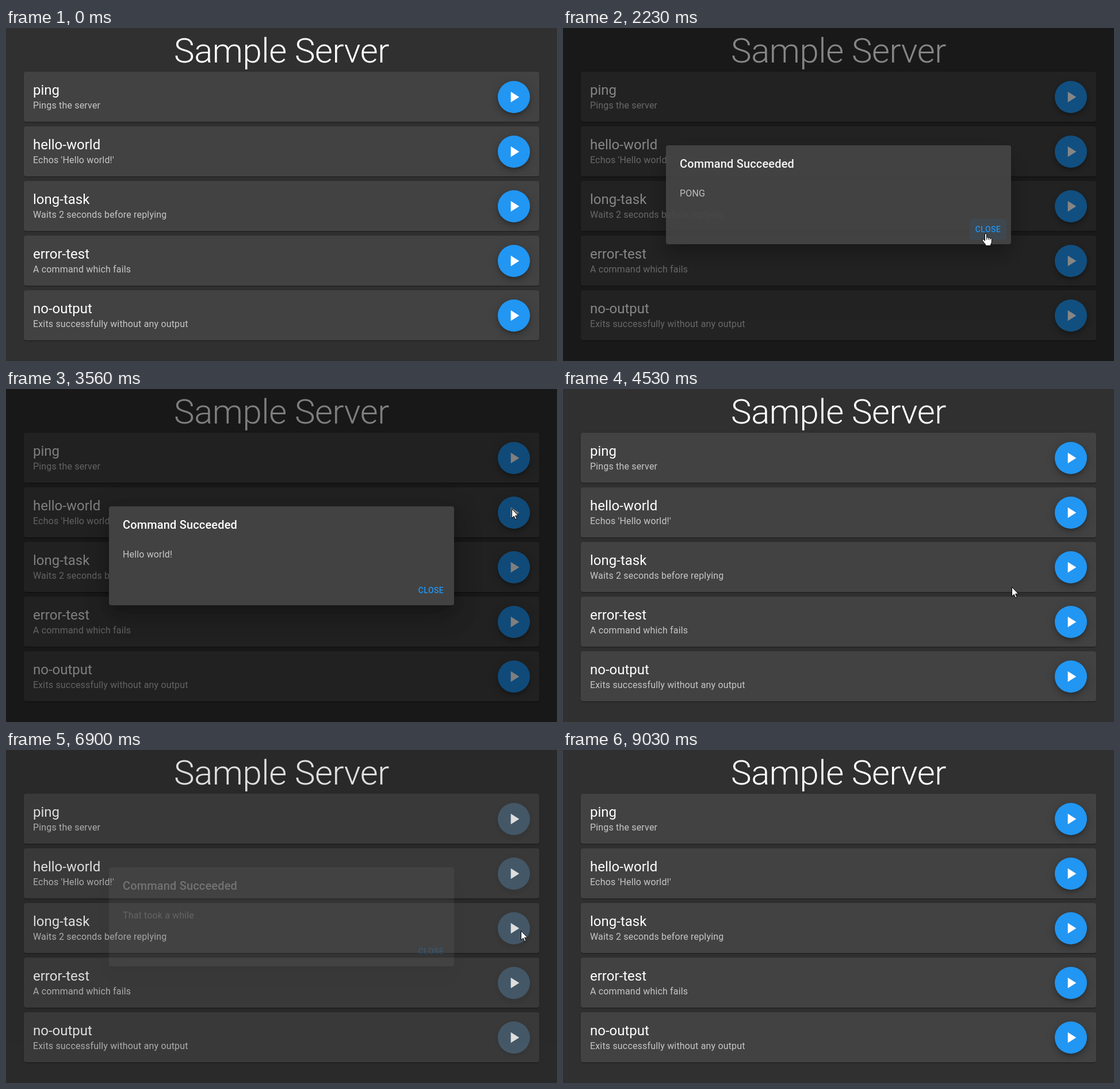
Recreate the animation shown at these times as an HTML page. Size 958 by 579 pixels, loop 9060 ms.

```html
<!DOCTYPE html>
<html lang="en">
<head>
<meta charset="utf-8">
<title>Sample Server</title>
<style>
  html, body { margin: 0; width: 100%; height: 100%; overflow: hidden; background: #303030; }
  #stage {
    position: relative; width: 958px; height: 579px; overflow: hidden;
    background: #303030; color: #fff; font: 400 16px Roboto, sans-serif; cursor: none;
  }
  #stage * { box-sizing: border-box; }
  h1, h2, h3, p { margin: 0; font-weight: 400; white-space: nowrap; }
  h1 {
    position: absolute; top: 4px; width: 100%; text-align: center;
    font-size: 60px; font-weight: 300; line-height: 72px; letter-spacing: -0.00833em;
  }
  .card {
    position: absolute; left: 31px; width: 896px; height: 87px; padding: 16px;
    border-radius: 4px; background: #424242;
    box-shadow: 0 2px 1px -1px rgba(0,0,0,.2), 0 1px 1px rgba(0,0,0,.14), 0 1px 3px rgba(0,0,0,.12);
  }
  .card h2 { font-size: 24px; line-height: 32px; }
  .card p { line-height: 22.88px; letter-spacing: 0.01071em; color: rgba(255,255,255,.7); }
  .fab { position: absolute; left: 824px; top: 16px; width: 56px; height: 56px; border-radius: 50%; }
  .fab svg { position: absolute; left: 12px; top: 12px; width: 32px; height: 32px; }
  #ring { position: absolute; left: 849px; width: 68px; height: 68px; }
  #ring circle { fill: none; stroke: #4caf50; stroke-width: 3.6; }
  #modal { position: absolute; inset: 0; background: rgba(0,0,0,.5); }
  #dialog {
    position: absolute; left: 179px; top: 204px; width: 600px; height: 172px;
    border-radius: 4px; background: #424242;
    box-shadow: 0 11px 15px -7px rgba(0,0,0,.2), 0 24px 38px 3px rgba(0,0,0,.14), 0 9px 46px 8px rgba(0,0,0,.12);
  }
  #dialog h3 {
    position: absolute; left: 24px; top: 16px;
    font-size: 20px; font-weight: 500; line-height: 32px; letter-spacing: 0.0075em;
  }
  #reply {
    position: absolute; left: 24px; top: 72px;
    line-height: 24px; letter-spacing: 0.00938em; color: rgba(255,255,255,.7);
  }
  #close {
    position: absolute; left: 528px; top: 128px; width: 64px; height: 36px; border-radius: 4px;
    text-align: center; color: #2196f3;
    font-size: 14px; font-weight: 500; line-height: 36px; letter-spacing: 0.02857em;
  }
  #cursor { position: absolute; left: 0; top: 0; width: 24px; height: 26px; overflow: visible; }
  #cursor path { fill: #fff; stroke: #000; stroke-width: 1; stroke-linejoin: round; }
  #cursor .line { fill: none; }
</style>
</head>
<body>
<div id="stage">
  <h1>Sample Server</h1>
  <div id="cards"></div>
  <svg id="ring" viewBox="0 0 44 44"><circle cx="22" cy="22" r="20.2"/></svg>
  <div id="modal">
    <div id="dialog">
      <h3>Command Succeeded</h3>
      <p id="reply"></p>
      <div id="close">CLOSE</div>
    </div>
  </div>
  <svg id="cursor">
    <path id="arrow" d="M.5 .5V16.6L4.2 13.1 6.6 18.8 9 17.8 6.6 12.2H11.7Z"/>
    <g id="hand">
      <path d="M-1.5 13V2Q-1.5 .5 0 .5T1.5 2V7.2Q3 6 4.5 7.6 6 6.7 7.3 8.4 10 7.6 10.4 10.4V15Q10.2 17.3 8.8 19V21.5H-.3V19.6Q-3.2 16.8-5.6 12.6-6.6 10.6-5.2 10.2-3.6 9.8-1.5 13Z"/>
      <path class="line" d="M1.5 7V11M4.5 7.8V11M7.4 8.5V11.5"/>
    </g>
  </svg>
</div>
<script>
const LOOP = 9060;
const FADE_IN = 225, FADE_OUT = 195, TINT = 250, SPIN = 1400;
const BLUE = [33, 150, 243], DARK = [25, 118, 210], GREY = [89, 89, 89];

const commands = [
  ["ping", "Pings the server"],
  ["hello-world", "Echos 'Hello world!'"],
  ["long-task", "Waits 2 seconds before replying"],
  ["error-test", "A command which fails"],
  ["no-output", "Exits successfully without any output"]
];

const runs = [
  { row: 0, click: 1050, reply: 1125, close: 2205, text: "PONG" },
  { row: 1, click: 3010, reply: 3085, close: 4230, text: "Hello world!" },
  { row: 2, click: 4980, reply: 6843, close: 7868, text: "That took a while" }
];

// row, pointer enters, pointer leaves or button is disabled
const hovers = [[0, 690, 1050], [1, 2690, 3010], [2, 4640, 4980], [2, 8063, 8160]];

// time, x, y of the pointer
const route = [
  [330, 960, 152], [850, 888, 122], [1400, 888, 122], [1950, 735, 357],
  [2380, 735, 357], [2830, 879, 208], [3680, 879, 208], [4080, 737, 355],
  [4380, 737, 355], [4800, 895, 314], [8050, 895, 314], [8380, 960, 338]
];

const $ = id => document.getElementById(id);
const clamp = x => Math.max(0, Math.min(1, x));
const mix = (a, b, p) => a + (b - a) * p;
const blend = (a, b, p) => a.map((v, i) => mix(v, b[i], p));

function bezier(x1, x2, y1, y2) {
  const at = (a, b, s) => 3 * (1 - s) * (1 - s) * s * a + 3 * (1 - s) * s * s * b + s * s * s;
  return x => {
    x = clamp(x);
    if (x === 0 || x === 1) return x;
    let lo = 0, hi = 1;
    for (let i = 0; i < 24; i++) {
      const mid = (lo + hi) / 2;
      if (at(x1, x2, mid) < x) lo = mid; else hi = mid;
    }
    return at(y1, y2, lo);
  };
}
const standard = bezier(.4, .2, 0, 1);
const easeInOut = bezier(.42, .58, 0, 1);

// rises after `from`, falls after `to`, also when cut short
const pulse = (t, from, to, up, down) =>
  standard((Math.min(t, to) - from) / up) * (1 - standard((t - to) / down));

const fabs = commands.map(([name, info], i) => {
  const card = document.createElement("div");
  card.className = "card";
  card.style.top = 76 + 95 * i + "px";
  card.innerHTML = `<h2>${name}</h2><p>${info}</p>
    <div class="fab"><svg viewBox="0 0 24 24"><path d="M8 5v14l11-7z"/></svg></div>`;
  $("cards").append(card);
  return { box: card.querySelector(".fab"), icon: card.querySelector("path") };
});

function drawFabs(t, busy) {
  const grey = Math.max(...runs.map(r => pulse(t, r.click, r.reply, TINT, TINT)));
  const shade = a => `rgba(0,0,0,${a * (1 - grey)})`;
  const shadow = `0 3px 5px -1px ${shade(.2)}, 0 6px 10px ${shade(.14)}, 0 1px 18px ${shade(.12)}`;
  fabs.forEach(({ box, icon }, i) => {
    const hover = Math.max(0, ...hovers.filter(h => h[0] === i)
      .map(h => pulse(t, h[1], h[2], TINT, TINT)));
    box.style.background = `rgb(${blend(blend(BLUE, DARK, hover), GREY, grey)})`;
    box.style.boxShadow = shadow;
    icon.setAttribute("fill", busy ? "rgba(255,255,255,.3)" : "#fff");
  });
}

function drawRing(t, busy) {
  $("ring").style.display = busy ? "" : "none";
  if (!busy) return;
  const turn = (t - busy.click) / SPIN % 1;
  const grow = easeInOut(turn * 2), chase = easeInOut(turn * 2 - 1);
  const circle = $("ring").firstElementChild;
  $("ring").style.top = 276 + 95 * (busy.row - 2) + "px";
  circle.setAttribute("stroke-dasharray", `${mix(1, 100, grow)} 200`);
  circle.setAttribute("stroke-dashoffset", -15 * grow - 110 * chase);
  circle.setAttribute("transform", `rotate(${turn * 360} 22 22)`);
}

function drawDialog(t, open, overClose) {
  $("modal").style.display = open ? "" : "none";
  if (!open) return;
  $("modal").style.opacity = pulse(t, open.reply, open.close, FADE_IN, FADE_OUT);
  $("reply").textContent = open.text;
  $("close").style.background = overClose ? "rgba(33,150,243,.08)" : "none";
}

function pointerAt(t) {
  const i = route.findIndex(p => p[0] > t);
  if (i < 1) return null;
  const [a, b] = [route[i - 1], route[i]];
  const p = easeInOut((t - a[0]) / (b[0] - a[0]));
  return { x: mix(a[1], b[1], p), y: mix(a[2], b[2], p) };
}

function drawPointer(pos, hand) {
  $("cursor").style.display = pos ? "" : "none";
  if (!pos) return;
  $("cursor").style.transform = `translate(${Math.round(pos.x)}px, ${Math.round(pos.y)}px)`;
  $("arrow").style.display = hand ? "none" : "";
  $("hand").style.display = hand ? "" : "none";
}

function draw(t) {
  const busy = runs.find(r => t >= r.click && t < r.reply);
  const open = runs.find(r => t >= r.reply && t < r.close + FADE_OUT);
  const pos = pointerAt(t);
  const overClose = !!(pos && open && pos.x > 707 && pos.x < 771 && pos.y > 332 && pos.y < 368);
  const overFab = !!pos && !open && !busy &&
    fabs.some((_, i) => Math.hypot(pos.x - 883, pos.y - 120 - 95 * i) < 28);
  drawFabs(t, busy);
  drawRing(t, busy);
  drawDialog(t, open, overClose);
  drawPointer(pos, overClose || overFab);
}

const start = performance.now();
function tick() {
  draw((performance.now() - start) % LOOP);
  requestAnimationFrame(tick);
}
tick();
</script>
</body>
</html>
```
